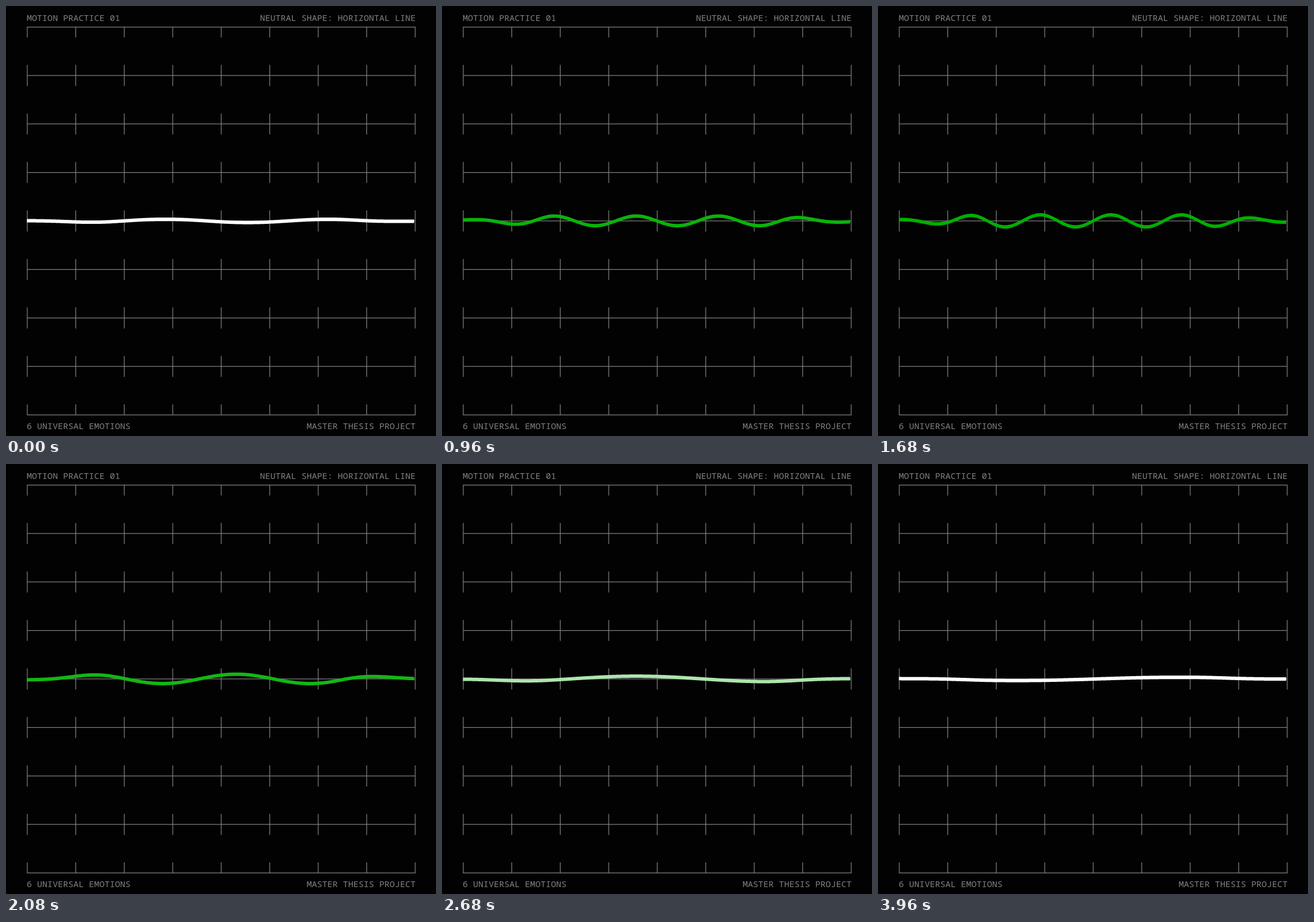
These frames come from a looping animation (748x748 px, 4000 ms). An HTML page:

```html
<!DOCTYPE html>
<html lang="en">
<head>
<meta charset="utf-8">
<title>Horizontal line</title>
<style>
  html, body { margin: 0; width: 100%; height: 100%; overflow: hidden; background: #020202; }
  svg { display: block; width: 100%; height: 100%; }
  text { font: 15.05px "Noto Sans Mono", "DejaVu Sans Mono", monospace; fill: #808080; }
  .end { text-anchor: end; }
  #grid { stroke: #808080; stroke-width: 1.25; fill: none; }
</style>
</head>
<body>
<svg viewBox="0 0 748 748">
  <path id="grid"/>
  <text x="36" y="26">MOTION PRACTICE 01</text>
  <text x="712.5" y="26" class="end">NEUTRAL SHAPE: HORIZONTAL LINE</text>
  <text x="36" y="735.5">6 UNIVERSAL EMOTIONS</text>
  <text x="712.5" y="735.5" class="end">MASTER THESIS PROJECT</text>
  <path id="wave"/>
</svg>
<script>
const LOOP = 4000, STEP = 40;
const LEFT = 36.5, RIGHT = 711, MIDDLE = 373.8, THICKNESS = 6;
const grid = document.getElementById('grid');
const wave = document.getElementById('wave');

const clamp = v => Math.min(1, Math.max(0, v));
const mix = (a, b, u) => a + (b - a) * u;
const ramp = (t, from, to) => clamp((t - from) / (to - from));

function drawGrid() {
  const cell = 84.35, left = 37, top = 36.5, tick = 18.3;
  const bottom = top + 8 * cell, right = left + 8 * cell;
  let d = '';
  for (let row = 0; row <= 8; row++) {
    const y = top + row * cell;
    d += `M${left - 0.6} ${y}H${right + 0.6}`;
    for (let col = 0; col <= 8; col++) {
      d += `M${left + col * cell} ${Math.max(top, y - tick)}V${Math.min(bottom, y + tick)}`;
    }
  }
  grid.setAttribute('d', d);
}

// The wave is held back near both ends of the line.
function pinning(x) {
  const u = clamp(Math.min(x - LEFT, RIGHT - x) / 160);
  return 0.23 + 0.77 * u * u * (3 - 2 * u);
}

function waveAt(t) {
  const rising = t < 1.5;
  const settle = ramp(t, 1.5, 3);
  const height = rising ? mix(2.9, 11.5, t / 1.5) : mix(11.5, 2.9, settle);
  const length = rising ? mix(286, 62.5, t / 1.5) : mix(62.5, 564, settle);
  const speed = mix(1.452, 1, ramp(t, 1.5, 2.775));
  const phase = 0.97 + speed * t;
  return x => MIDDLE - height * pinning(x) * Math.cos(2 * Math.PI * (x / length - phase));
}

function colorAt(t) {
  const green = ramp(t, 0, 1) - ramp(t, 2, 3);
  const side = Math.round(mix(255, 0, green));
  return `rgb(${side},${Math.round(mix(255, 176, green))},${side})`;
}

function render(ms) {
  const t = Math.floor((ms % LOOP) / STEP) * STEP / 1000;
  const y = waveAt(t);
  const upper = [], lower = [];
  for (let x = LEFT; x <= RIGHT; x += 1.5) {
    const mid = y(x);
    upper.push(`${x} ${(mid - THICKNESS / 2).toFixed(2)}`);
    lower.unshift(`${x} ${(mid + THICKNESS / 2).toFixed(2)}`);
  }
  wave.setAttribute('d', `M${upper.concat(lower).join('L')}Z`);
  wave.setAttribute('fill', colorAt(t));
}

drawGrid();
const start = performance.now();
(function tick() {
  render(performance.now() - start);
  requestAnimationFrame(tick);
})();
</script>
</body>
</html>
```
